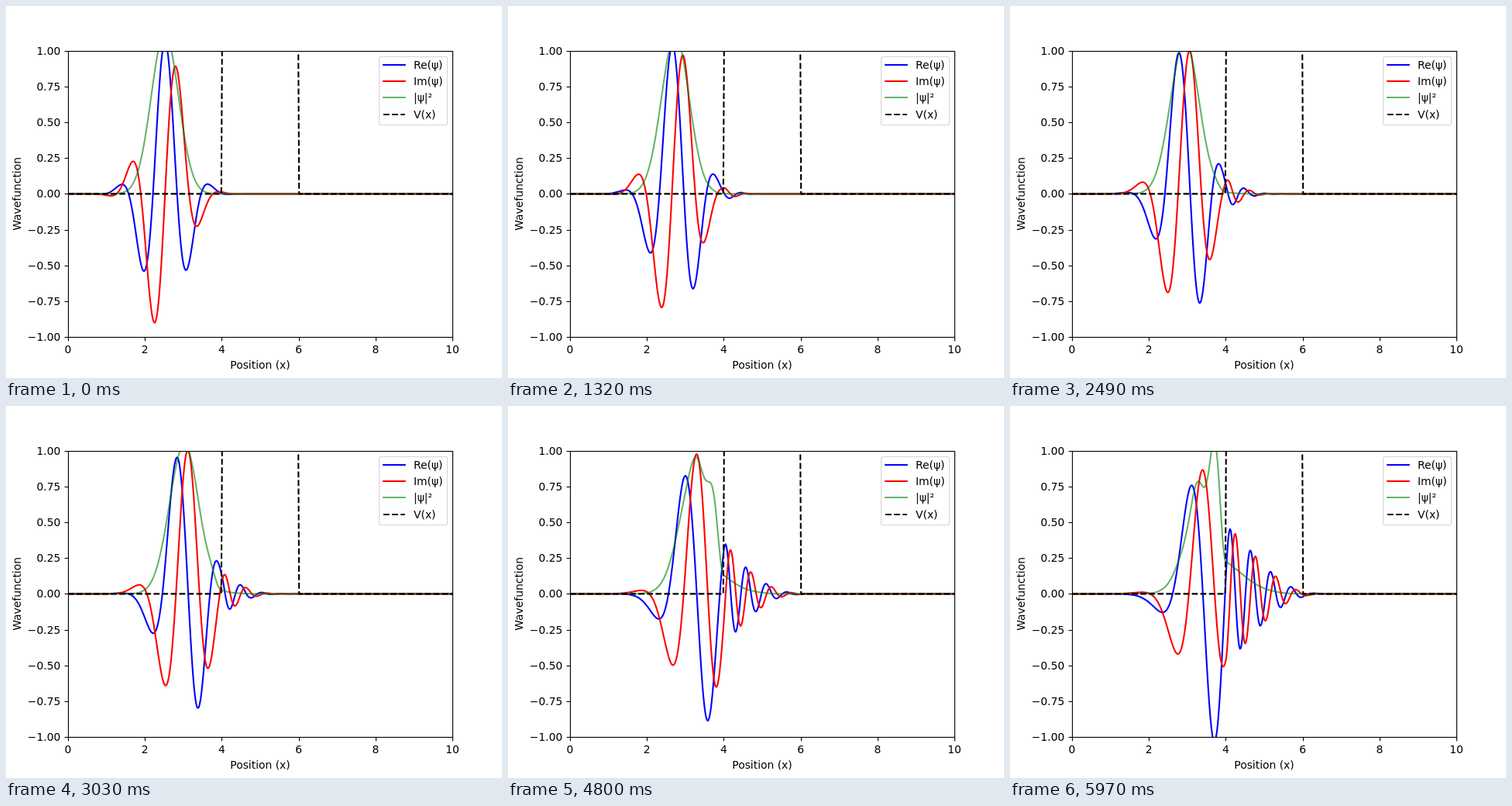
Write an HTML page with a canvas that moves like this. It is 640 by 480 pixels and loops after 6 s.

```html
<!DOCTYPE html>
<html>
<head>
<meta charset="utf-8">
<style>
html, body { margin: 0; width: 100%; height: 100%; overflow: hidden; background: #fff; }
canvas { display: block; }
</style>
</head>
<body>
<canvas id="stage" width="640" height="480"></canvas>
<script>
const ctx = document.getElementById('stage').getContext('2d');
const N = 500, FRAMES = 200, FRAME_MS = 30, WARMUP = 4;
const dx = 10 / (N - 1), dt = 0.001, DEPTH = 50;
const LINE = 2.083, THIN = 1.11, DASH = [7.708, 3.333];
const GREEN = 'rgba(0,128,0,0.6)';

const px = x => 80 + 49.6 * x;
const py = v => 242.4 - 184.8 * v;
const snap = v => Math.floor(v + 0.5) + 0.5;
const grid = Array.from({ length: N }, (_, j) => j * dx);
const inside = grid.map(x => (x >= 4 && x <= 6 ? 1 : 0));

// Gaussian packet, centre 2.5, width 0.5, wave number 5
function packet() {
  const amp = grid.map(x => Math.exp(-2 * (x - 2.5) ** 2) / Math.sqrt(0.5 * Math.sqrt(Math.PI)));
  return {
    re: grid.map((x, j) => amp[j] * Math.cos(5 * x)),
    im: grid.map((x, j) => amp[j] * Math.sin(5 * x))
  };
}

// One Crank-Nicolson step: psi' = 2 (1 + i H dt/2)^-1 psi - psi
function step({ re, im }) {
  const r = dt / (4 * dx * dx);
  const cr = [], ci = [], dr = [], di = [];
  let pcr = 0, pci = 0, pdr = 0, pdi = 0;
  for (let j = 0; j < N; j++) {
    const a = 1 - r * pci;
    const b = 2 * r - DEPTH * inside[j] * dt / 2 + r * pcr;
    const m = a * a + b * b;
    const u = re[j] - r * pdi, v = im[j] + r * pdr;
    cr[j] = pcr = -r * b / m;
    ci[j] = pci = -r * a / m;
    dr[j] = pdr = (u * a + v * b) / m;
    di[j] = pdi = (v * a - u * b) / m;
  }
  const next = { re: [], im: [] };
  let sr = 0, si = 0;
  for (let j = N - 1; j >= 0; j--) {
    const tr = dr[j] - cr[j] * sr + ci[j] * si;
    si = di[j] - cr[j] * si - ci[j] * sr;
    sr = tr;
    next.re[j] = 2 * sr - re[j];
    next.im[j] = 2 * si - im[j];
  }
  return next;
}

const states = [];
let psi = packet();
for (let n = 0; n < WARMUP + FRAMES; n++) {
  if (n >= WARMUP) states.push(psi);
  psi = step(psi);
}

function stroke(points, color, width = LINE, dash = []) {
  ctx.beginPath();
  points.forEach(([x, y]) => ctx.lineTo(x, y));
  ctx.strokeStyle = color;
  ctx.lineWidth = width;
  ctx.setLineDash(dash);
  ctx.stroke();
}

function curve(values, color, dash) {
  stroke(values.map((v, j) => [px(grid[j]), py(v)]), color, LINE, dash);
}

function label(text, x, y, align) {
  ctx.textAlign = align;
  ctx.fillText(text, x, y);
}

function axes() {
  ctx.fillStyle = '#000';
  ctx.font = '13.89px "DejaVu Sans", sans-serif';
  for (let x = 0; x <= 10; x += 2) {
    const sx = snap(px(x));
    stroke([[sx, 427.5], [sx, 432.4]], '#000', THIN);
    label(x, px(x), 448, 'center');
  }
  for (let v = -1; v <= 1; v += 0.25) {
    const sy = snap(py(v));
    stroke([[75.6, sy], [80.5, sy]], '#000', THIN);
    label(v.toFixed(2).replace('-', '\u2212'), 70.3, Math.round(py(v) + 5), 'right');
  }
  ctx.setLineDash([]);
  ctx.strokeRect(80.5, 58.5, 496, 369);
  label('Position (x)', 328, 468, 'center');
  ctx.save();
  ctx.translate(19, 242.4);
  ctx.rotate(-Math.PI / 2);
  label('Wavefunction', 0, 0, 'center');
  ctx.restore();
}

function legend() {
  ctx.beginPath();
  ctx.roundRect(481.5, 65.5, 88, 88, 2.8);
  ctx.fillStyle = 'rgba(255,255,255,0.8)';
  ctx.fill();
  ctx.strokeStyle = 'rgba(204,204,204,0.8)';
  ctx.lineWidth = THIN;
  ctx.setLineDash([]);
  ctx.stroke();
  ctx.fillStyle = '#000';
  const rows = [['Re(ψ)', 'blue', 76], ['Im(ψ)', 'red', 97], ['|ψ|²', GREEN, 118], ['V(x)', '#000', 140]];
  for (const [text, color, y] of rows) {
    const dashed = text === 'V(x)', cap = dashed ? 0 : 1;
    stroke([[487 - cap, y], [514.8 + cap, y]], color, 2, dashed ? DASH : []);
    label(text, 526, y + 5, 'left');
  }
}

function draw({ re, im }) {
  ctx.fillStyle = '#fff';
  ctx.fillRect(0, 0, 640, 480);
  ctx.save();
  ctx.beginPath();
  ctx.rect(80, 58, 497, 370);
  ctx.clip();
  ctx.lineJoin = 'round';
  curve(re, 'blue');
  curve(im, 'red');
  curve(re.map((v, j) => v * v + im[j] ** 2), GREEN);
  curve(inside, '#000', DASH);
  ctx.restore();
  axes();
  legend();
}

const start = performance.now();
function tick() {
  const elapsed = Math.max(0, performance.now() - start);
  draw(states[Math.floor(elapsed / FRAME_MS) % FRAMES]);
  requestAnimationFrame(tick);
}
tick();
</script>
</body>
</html>
```
